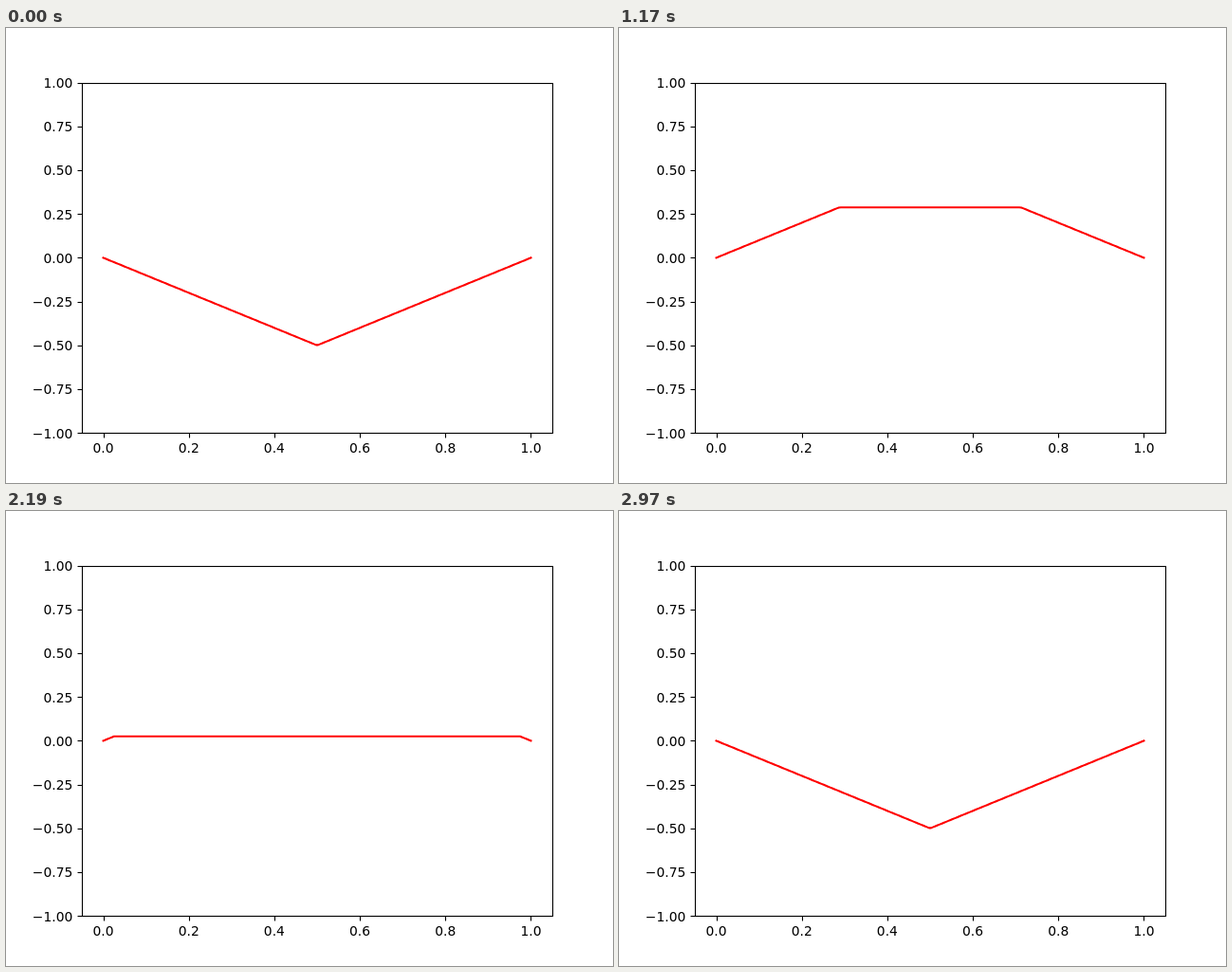
These frames come from a looping animation (640 by 480 pixels, 3 s). An HTML page:

```html
<!DOCTYPE html>
<html lang="en">
<head>
<meta charset="utf-8">
<title>Plucked string</title>
<style>
  html, body { margin: 0; width: 100%; height: 100%; overflow: hidden; background: #fff; }
  svg { display: block; }
  text { font: 13.889px "DejaVu Sans", sans-serif; fill: #000; }
</style>
</head>
<body>
<svg width="640" height="480" viewBox="0 0 640 480">
  <g id="axes" fill="none" stroke="#000" stroke-width="1.111"></g>
  <g id="labels"></g>
  <polyline id="string" fill="none" stroke="#f00" stroke-width="2.083" stroke-linejoin="round" stroke-linecap="square"/>
</svg>
<script>
const STEP_MS = 30, STEPS = 100, SAMPLES = 200;
const axes = document.getElementById('axes');
const labels = document.getElementById('labels');
const string = document.getElementById('string');

const px = x => 80 + 496 * (x + 0.05) / 1.1;
const py = y => 242.4 - 184.8 * y;
const snap = v => Math.floor(v + 0.5) + 0.5;

function add(parent, name, attrs, content = '') {
  const el = document.createElementNS('http://www.w3.org/2000/svg', name);
  for (const key in attrs) el.setAttribute(key, attrs[key]);
  el.textContent = content;
  parent.appendChild(el);
}

function drawAxes() {
  for (let i = 0; i <= 5; i++) {
    const x = px(i / 5);
    add(axes, 'path', { d: `M${snap(x)} 427.5v5` });
    add(labels, 'text', { x, y: 448, 'text-anchor': 'middle' }, (i / 5).toFixed(1));
  }
  for (let i = -4; i <= 4; i++) {
    const y = py(i / 4);
    add(axes, 'path', { d: `M80.5 ${snap(y)}h-5` });
    add(labels, 'text', { x: 70.3, y: Math.round(y + 5.3), 'text-anchor': 'end' },
      (i / 4).toFixed(2).replace('-', '\u2212'));
  }
  add(axes, 'rect', { x: 80.5, y: 58.5, width: 496, height: 369 });
}

// The flat middle travels at constant speed, bounded by the triangle envelope.
function drawString(step) {
  const level = 0.5 - Math.abs(1 - 2 * step / (STEPS - 1));
  const points = [];
  for (let i = 0; i < SAMPLES; i++) {
    const x = i / (SAMPLES - 1);
    const limit = Math.min(x, 1 - x);
    const y = Math.max(-limit, Math.min(limit, level));
    points.push(px(x).toFixed(2) + ',' + py(y).toFixed(2));
  }
  string.setAttribute('points', points.join(' '));
}

const start = performance.now();
function tick() {
  drawString(Math.floor((performance.now() - start) / STEP_MS) % STEPS);
  requestAnimationFrame(tick);
}

drawAxes();
tick();
</script>
</body>
</html>
```
